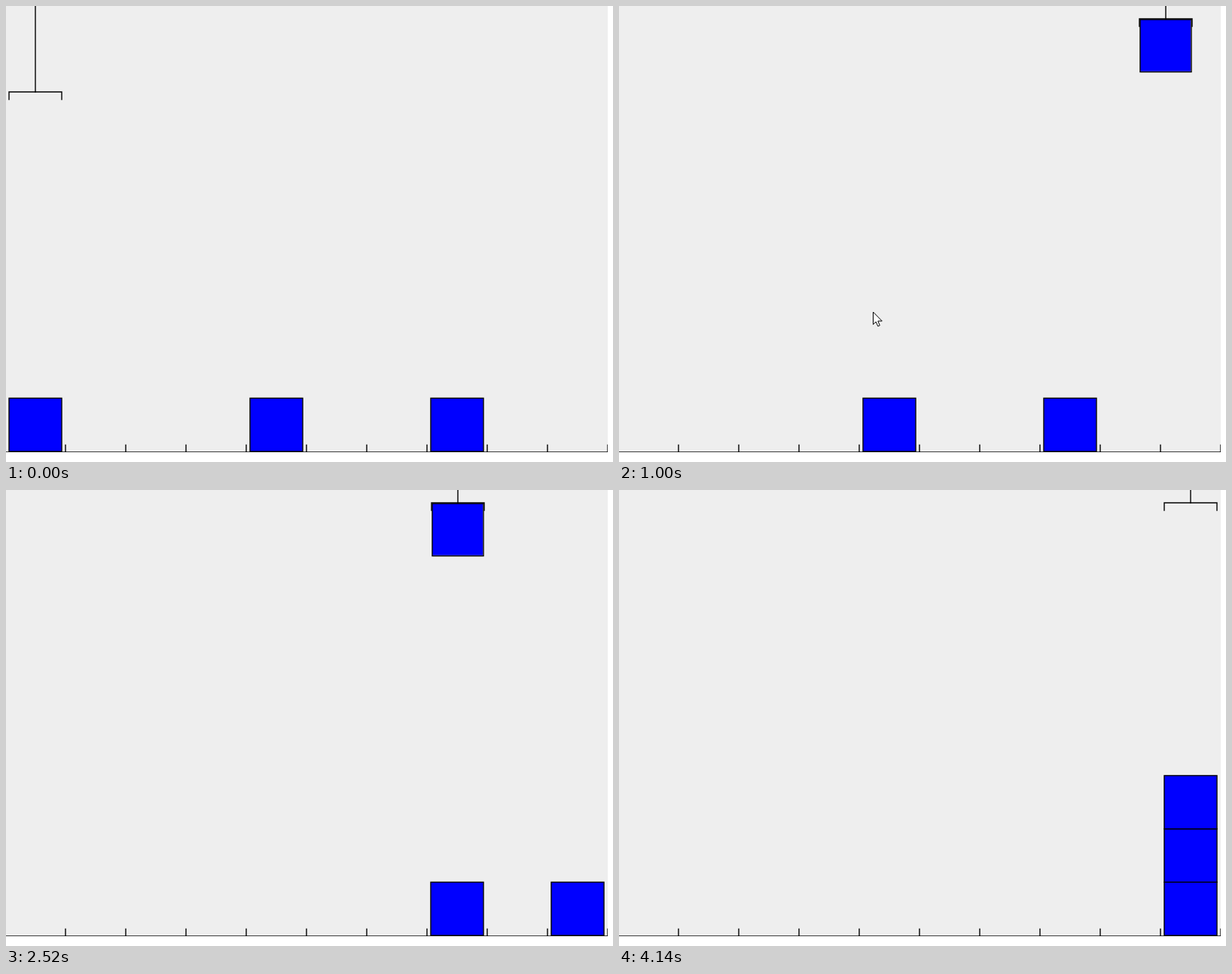
Recreate the animation shown at these times as an HTML page with a canvas. Size 806x605 px, loop 4290 ms.

```html
<!DOCTYPE html>
<html lang="en">
<head>
<meta charset="utf-8">
<title>Gripper stacking blocks</title>
<style>
  html, body { margin: 0; width: 100%; height: 100%; overflow: hidden; background: #fff; }
  canvas { display: block; }
</style>
</head>
<body>
<canvas id="stage" width="806" height="605"></canvas>
<script>
const ctx = document.getElementById('stage').getContext('2d');
const LOOP = 4290, TICK = 76.6, LAST_TICK = 54;
const W = 799, H = 592;
const TOP = 17, FLOOR = 520.3, SIZE = 70.7, STACK_X = 759;
const RISE = 2.25, SLIDE = 1.238; // px per ms

const BLOCKS = [
  { x: 39, grab: 217, drop: 1255 },
  { x: 359, grab: 2033, drop: 2796 },
  { x: 599, grab: 3357, drop: 3905 }
];

const stackY = level => FLOOR - level * SIZE;

// The gripper rises, slides and sinks from each stop to the next, then waits there.
const STOPS = [
  { t: -43, x: BLOCKS[0].x, y: TOP },
  ...BLOCKS.flatMap((b, level) => [
    { t: b.grab, x: b.x, y: FLOOR },
    { t: b.drop, x: STACK_X, y: stackY(level) }
  ]),
  { t: LOOP, x: STACK_X, y: TOP }
];

function gripperAt(t) {
  const next = STOPS.findIndex(s => s.t > t);
  const from = STOPS[next - 1], to = STOPS[next];
  const up = (from.y - TOP) / RISE;
  const across = Math.abs(to.x - from.x) / SLIDE;
  const dt = t - from.t;
  if (dt < up) return [from.x, from.y - dt * RISE];
  if (dt < up + across) return [from.x + (to.x - from.x) * (dt - up) / across, TOP];
  return [to.x, Math.min(to.y, TOP + (dt - up - across) * RISE)];
}

// Quick flick in, slow drift, quick flick out
function pointerAt(tick) {
  const step = tick - 6;
  const drift = Math.min(Math.max(step - 1, 0), 6);
  const flicks = Math.min(step, 1) + Math.max(step - 7, 0);
  return [162 + flicks * 67 + drift * 18, 80 + flicks * 125 + drift * 33.5];
}

function line(...pts) {
  ctx.beginPath();
  pts.forEach(([x, y]) => ctx.lineTo(x, y));
  ctx.stroke();
}

function block(x, y, w, h, gap) {
  ctx.fillStyle = '#00f';
  ctx.fillRect(x, y, w - gap, h - gap);
  ctx.strokeRect(x, y, w, h);
}

function drawFloor() {
  ctx.fillStyle = '#eee';
  ctx.fillRect(0, 0, W, H);
  line([0, H], [W, H]);
  for (let x = 79; x <= W; x += 80) line([x, H - 9.5], [x, H]);
}

function drawGripper(x, y) {
  line([x, 0], [x, y]);
  line([x - 35, y + 10], [x - 35, y], [x + 35, y], [x + 35, y + 10]);
}

const arrow = new Path2D('M0 0V16L3.7 12.5L6.3 18.4L8.8 17.3L6.3 11.5H11.3Z');

function drawPointer(x, y) {
  ctx.save();
  ctx.translate(Math.round(x) + .5, Math.round(y) + .5);
  ctx.lineWidth = 1;
  ctx.fillStyle = '#fff';
  ctx.fill(arrow);
  ctx.stroke(arrow);
  ctx.restore();
}

function draw(tick) {
  const t = tick * TICK;
  const [x, y] = gripperAt(t).map(v => Math.round(v * 2) / 2);
  ctx.clearRect(0, 0, 806, 605);
  ctx.save();
  ctx.beginPath();
  ctx.rect(0, 0, W, H);
  ctx.clip();
  ctx.strokeStyle = '#000';
  ctx.lineWidth = 1.4;
  ctx.lineCap = 'square';
  drawFloor();
  BLOCKS.forEach((b, level) => {
    if (t < b.grab) block(b.x - 35, FLOOR, 70, SIZE, .2);
    else if (t < b.drop) block(x - 34, y + 1, 68, 69.5, .8);
    else block(STACK_X - 35, stackY(level), 70, SIZE, .2);
  });
  drawGripper(x, y);
  if (tick >= 6 && tick <= 14) drawPointer(...pointerAt(tick));
  ctx.restore();
}

const began = performance.now();
function frame() {
  const t = (performance.now() - began) % LOOP;
  draw(Math.min(Math.floor(t / TICK), LAST_TICK));
  requestAnimationFrame(frame);
}
frame();
</script>
</body>
</html>
```
